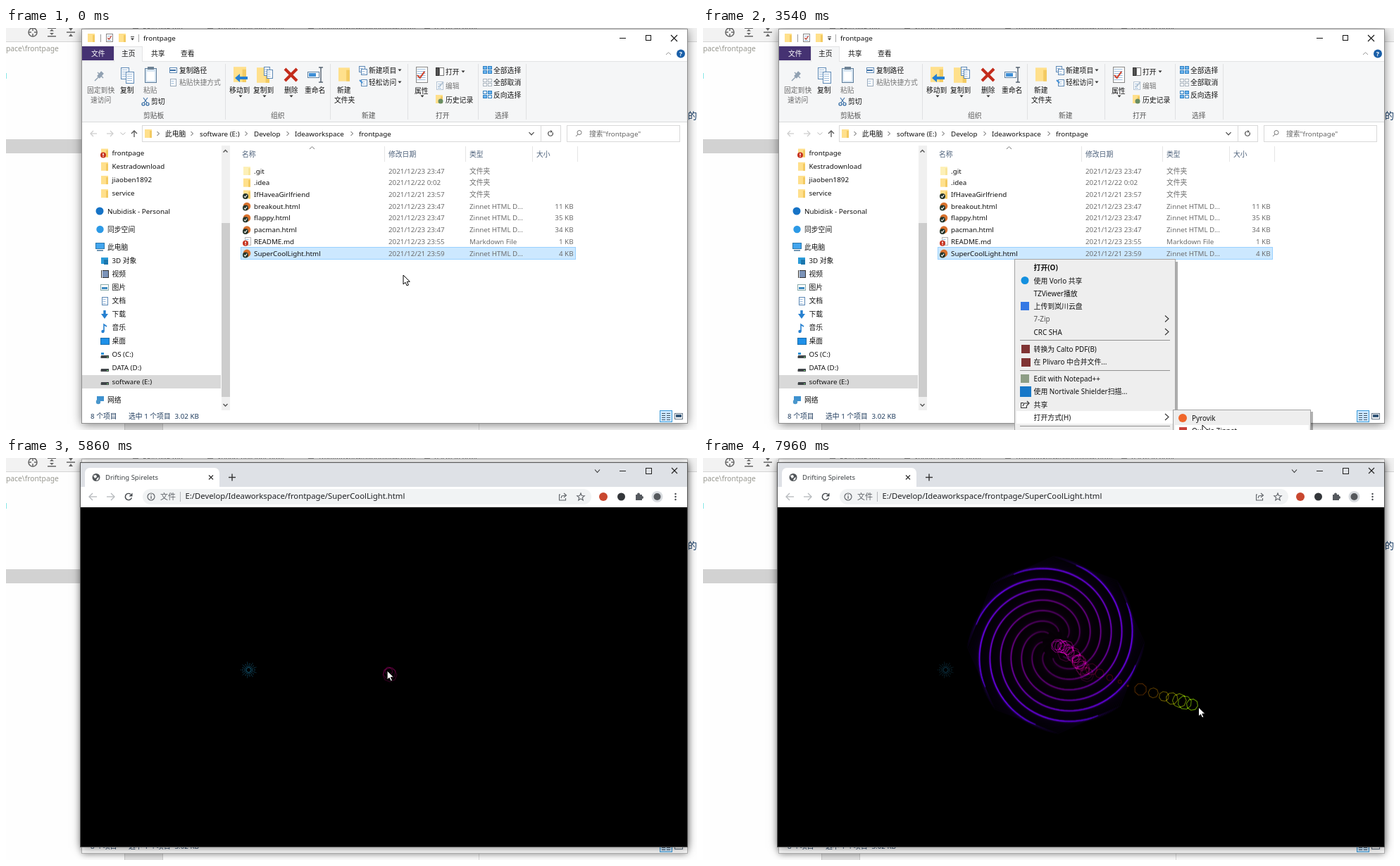
Write an HTML page with a canvas that moves like this. It is 981x571 px and loops after 8000 ms.

```html
<!DOCTYPE html>
<html lang="zh-CN">
<head>
<meta charset="utf-8">
<style>
html,body{margin:0;width:100%;height:100%;overflow:hidden;background:#fff}
canvas{display:block}
</style>
</head>
<body>
<canvas id="stage" width="981" height="571"></canvas>
<script>
const LOOP = 8000;
const FONT = '"Noto Sans","Noto Sans CJK SC","Noto Sans CJK",sans-serif';
const cv = document.getElementById('stage');
const c = cv.getContext('2d');
const layer = document.createElement('canvas');
layer.width = layer.height = 280;
const g = layer.getContext('2d');

const clamp = (v, a = 0, b = 1) => Math.min(b, Math.max(a, v));
const mix = (a, b, u) => a + (b - a) * u;

function box(x, y, w, h, fill) { c.fillStyle = fill; c.fillRect(x, y, w, h); }
function rim(x, y, w, h, col) { c.strokeStyle = col; c.lineWidth = 1; c.strokeRect(x + .5, y + .5, w - 1, h - 1); }
function panel(x, y, w, h, fill, col) { box(x, y, w, h, fill); rim(x, y, w, h, col); }
function dot(x, y, r, fill) { c.fillStyle = fill; c.beginPath(); c.arc(x, y, r, 0, 7); c.fill(); }
function ring(x, y, r, col, w = 1) { c.strokeStyle = col; c.lineWidth = w; c.beginPath(); c.arc(x, y, r, 0, 7); c.stroke(); }
function round(x, y, w, h, r, fill) { c.fillStyle = fill; c.beginPath(); c.roundRect(x, y, w, h, r); c.fill(); }
function line(col, w, ...p) {
  c.strokeStyle = col; c.lineWidth = w; c.beginPath();
  for (let i = 0; i < p.length; i += 2) c.lineTo(p[i], p[i + 1]);
  c.stroke();
}
function poly(fill, ...p) {
  c.fillStyle = fill; c.beginPath();
  for (let i = 0; i < p.length; i += 2) c.lineTo(p[i], p[i + 1]);
  c.fill();
}
function txt(s, x, y, col = '#111', size = 9.8, weight = '') {
  c.font = `${weight} ${size}px ${FONT}`;
  c.fillStyle = col;
  c.fillText(s, x, y + 3.6);
}
function rtxt(s, x, y, col) { c.textAlign = 'right'; txt(s, x, y, col); c.textAlign = 'left'; }
function chevron(x, y, d, col, w = 1) { line(col, w, x - 3.5, y - d, x, y + d, x + 3.5, y - d); }
const caret = (x, y) => poly('#333', x - 2.5, y - 1.5, x + 2.5, y - 1.5, x, y + 1.5);

// Icons, placed by their centre
function folder(x, y, k = 1, pale) {
  box(x - 5 * k, y - 6 * k, 10 * k, 12 * k, pale ? '#fdf0b8' : '#ffe08c');
  box(x + 2 * k, y - 4 * k, 3 * k, 10 * k, pale ? '#f8e59c' : '#f3ca62');
}
function page(x, y, w, h, col = '#5c88b5') {
  panel(Math.round(x - w / 2), Math.round(y - h / 2), w, h, '#fff', col);
  for (let i = 3; i < h - 2; i += 3) box(x - w / 2 + 2, Math.round(y - h / 2) + i, w - 5, 1, '#9dbcdc');
}
function badge(x, y, bad) {
  dot(x, y, 4, bad ? '#c6321f' : '#25352a');
  if (bad) { box(x - .7, y - 2.5, 1.4, 3, '#fff'); box(x - .7, y + 1.3, 1.4, 1.2, '#fff'); }
  else line('#fff', 1.1, x - 2, y, x - .5, y + 1.7, x + 2.2, y - 1.8);
}
function arrowDown(x, y) {
  box(x - 1.7, y - 6, 3.4, 6, '#2680d0');
  poly('#2680d0', x - 5, y - 1, x + 5, y - 1, x, y + 6);
}
function monitor(x, y) { panel(x - 6, y - 6, 13, 9, '#42a5ee', '#2877ad'); box(x - 4, y + 4, 9, 2, '#7296b2'); }
function drive(x, y, sys) {
  if (sys) box(x - 5, y - 4, 4, 3, '#2f93d8');
  box(x - 5, y, 11, 4, '#3f4448'); box(x - 6, y + 1, 1, 3, '#aaa'); box(x + 3, y + 2, 2, 1, '#7ce07c');
}
function tick(x, y, k, col) { line(col, 1.6 * k, x - 4 * k, y, x - k, y + 3 * k, x + 4 * k, y - 4 * k); }

function backdrop() {
  box(0, 0, 981, 571, '#fefefe');
  box(0, 0, 981, 19, '#f2f2f2');
  box(0, 19, 981, 1, '#d5d5d5');
  ring(38, 6, 6, '#666', 1.5);
  line('#666', 1.5, 38, 0, 38, 4); line('#666', 1.5, 38, 8, 38, 12);
  line('#666', 1.5, 32, 6, 36, 6); line('#666', 1.5, 40, 6, 44, 6);
  box(59, 0, 12, 1, '#666'); box(59, 11, 12, 1.5, '#666');
  poly('#666', 62, 4.5, 68, 4.5, 65, 1.5); poly('#666', 62, 7, 68, 7, 65, 10);
  box(86, 5.3, 12, 1.5, '#666');
  poly('#666', 89, 0, 95, 0, 92, 4); poly('#666', 89, 12, 95, 12, 92, 8);
  for (const [s, x] of [['README.md', 194], ['SuperCoolLight.html', 300], ['TreeAndSnow\\MoonView.html', 443], ['pacman.html', 608]]) {
    txt(s, x, 0, '#777');
    box(x - 14, 0, 8, 3, '#999');
  }
  txt('pace\\frontpage', 0, 29, '#989890', 10.3);
  box(0, 64, 1, 8, '#88e8e8');
  box(0, 158, 108, 20, '#d2d2d2');
  txt('虑的', 955, 125, '#143b66', 13);
  box(168, 561, 55, 10, '#e6e6e6');
  box(168, 561, 1, 10, '#ccc'); box(222, 561, 1, 10, '#ccc'); box(671, 561, 1, 10, '#ddd');
}

// The shadow stays outside the rectangle, so a translucent fill is not darkened
function shadowed(x, y, w, h, fill, blur, alpha) {
  c.save();
  c.beginPath(); c.rect(0, 0, 981, 571); c.rect(x, y, w, h); c.clip('evenodd');
  c.shadowColor = `rgba(0,0,0,${alpha})`; c.shadowBlur = blur; c.shadowOffsetY = 2;
  box(x, y, w, h, '#fff');
  c.restore();
  box(x, y, w, h, fill);
}

function ribbon(off) {
  folder(121, 14);
  box(134, 9, 1, 11, '#999');
  page(147, 14, 10, 12, '#888'); tick(147, 14, .7, '#d0452f');
  folder(165, 14);
  box(177, 12, 5, 1, '#444'); caret(179.5, 16);
  box(188, 9, 1, 11, '#aaa');
  txt('frontpage', 195, 14, off ? '#8a8a8a' : '#111');
  const ctl = off ? '#999' : '#111';
  box(871, 14, 9, 1, ctl); rim(908, 10, 8, 8, ctl);
  line(ctl, 1.1, 944, 10, 953, 19); line(ctl, 1.1, 953, 10, 944, 19);
  box(108, 26, 45, 20, '#453272');
  txt('文件', 121, 36, '#fff');
  box(108, 47, 859, 86, '#f5f6f7');
  box(108, 47, 859, 1, '#e3e4e5');
  panel(153, 26, 41, 22, '#f5f6f7', '#e3e4e5'); box(154, 46, 39, 3, '#f5f6f7');
  txt('主页', 164, 36); txt('共享', 206, 36); txt('查看', 248, 36);
  line('#999', 1, 937, 38, 940.5, 34.5, 944, 38);
  dot(958, 36.5, 6, '#1a5fa8'); txt('?', 955.7, 36.5, '#fff', 9, 'bold');
  box(108, 133, 859, 1, '#dadbdc');
  for (const x of [311, 460, 570, 670, 738]) box(x, 51, 1, 79, '#e0e1e3');

  line('#91a1b2', 5, 131, 70, 137, 63); line('#91a1b2', 1.5, 130, 63, 138, 71); line('#91a1b2', 1.5, 126, 75, 132, 69);
  page(169, 64, 12, 17); page(176, 70, 12, 17);
  panel(197, 57, 17, 21, '#d8e6f2', '#5f7d9a'); box(201, 55, 9, 4, '#6e8294'); box(200, 62, 11, 13, '#fff');
  page(237, 60, 11, 8); box(233, 59, 8, 2, '#3b6fa5');
  page(237, 77, 9, 11, '#9ab');
  line('#4475a8', 1.2, 195, 99, 200, 106); line('#4475a8', 1.2, 201, 99, 196, 106);
  ring(195, 108, 2, '#2b65a0', 1.2); ring(201, 108, 2, '#2b65a0', 1.2);
  folder(332, 66, 1.8); poly('#2580d2', 325, 71, 332, 65, 332, 69, 343, 69, 343, 73, 332, 73, 332, 77);
  folder(365, 67, 1.8); page(370, 61, 9, 13); page(374, 65, 9, 13);
  line('#c32c1c', 4, 396, 58, 413, 75); line('#c32c1c', 4, 413, 58, 396, 75);
  panel(428, 62, 17, 9, '#fff', '#5d7f9f'); box(430, 64, 10, 5, '#3f8fd6');
  line('#345', 1.2, 444, 56, 450, 56); line('#345', 1.2, 447, 56, 447, 77); line('#345', 1.2, 444, 77, 450, 77);
  folder(480, 66, 1.6);
  page(505, 58, 9, 9); page(508, 62, 9, 9);
  page(508, 78, 9, 10); line('#3f8fd6', 2, 502, 74, 506, 78);
  page(590, 66, 17, 23, '#888'); tick(589, 67, 1.3, '#d0452f');
  panel(610, 56, 5, 12, '#555', '#333'); panel(615, 56, 7, 12, '#fff', '#777');
  page(616, 82, 10, 12, '#b5c4d3'); line('#b5c4d3', 2, 614, 84, 621, 77);
  folder(615, 101); dot(617, 104, 3.5, '#698d62');
  for (let i = 0; i < 3; i++) for (let k = 0; k < 4; k++) {
    const x = 677 + (k % 2) * 7, y = 54 + i * 17.5 + (k >> 1) * 6;
    panel(x, Math.round(y), 6, 5, i == 0 || i == 2 && (k == 1 || k == 2) ? '#6db5ef' : '#fff', i == 1 ? '#a9b4be' : '#2d7fc2');
  }
  const gray = '#777';
  txt('固定到快', 115, 88, '#666'); txt('速访问', 120, 102, '#666');
  txt('复制', 162, 88); txt('粘贴', 195, 88, gray);
  txt('复制路径', 246, 60); txt('粘贴快捷方式', 246, 77, gray); txt('剪切', 206, 104);
  txt('移动到', 317, 88); txt('复制到', 351, 88); txt('删除', 395, 88); txt('重命名', 424, 88);
  for (const x of [333, 367, 405, 591]) caret(x, 97);
  txt('新建', 470, 88); txt('文件夹', 466, 102);
  txt('新建项目', 515, 60); txt('轻松访问', 515, 77); caret(559, 60); caret(559, 77);
  txt('属性', 580, 89); txt('打开', 624, 62); caret(649, 62);
  txt('编辑', 624, 82, gray); txt('历史记录', 624, 102);
  txt('全部选择', 692, 60); txt('全部取消', 692, 77); txt('反向选择', 692, 95);
  for (const [s, x] of [['剪贴板', 195], ['组织', 376], ['新建', 505], ['打开', 610], ['选择', 694]]) txt(s, x, 124, '#555');
}

function addressBar() {
  line('#ccc', 1.2, 124, 146, 120, 150, 124, 154); line('#ccc', 1.2, 120, 150, 129, 150);
  line('#ccc', 1.2, 148, 146, 152, 150, 148, 154); line('#ccc', 1.2, 143, 150, 152, 150);
  chevron(166, 150, 1.5, '#bbb');
  line('#555', 1.3, 178, 150, 182, 146, 186, 150); line('#555', 1.3, 182, 146, 182, 155);
  panel(193, 138, 595, 24, '#fff', '#d9d9d9'); box(759, 138, 1, 24, '#d9d9d9');
  folder(202, 150);
  for (const x of [216, 264, 341, 400, 491]) line('#555', 1, x - 1.5, 147, x + 1.5, 150, x - 1.5, 153);
  for (const [s, x] of [['此电脑', 226], ['software (E:)', 275], ['Develop', 352], ['Ideaworkspace', 410], ['frontpage', 501]]) txt(s, x, 150);
  chevron(746, 150, 1.8, '#444', 1.2);
  c.strokeStyle = '#555'; c.lineWidth = 1.1; c.beginPath(); c.arc(773, 150, 3.3, -.6, 4.6); c.stroke();
  poly('#555', 773, 145, 776, 147, 773, 149);
  panel(796, 138, 161, 24, '#fff', '#d9d9d9');
  ring(814, 148.5, 3, '#777'); line('#777', 1, 812, 151, 809, 154);
  txt('搜索"frontpage"', 828, 150, '#666');
}

function sidebar() {
  box(108, 493, 197, 19, '#d9d9d9');
  ['frontpage', 'Kestradownload', 'jiaoben1892', 'service'].forEach((s, i) => {
    const y = 177 + i * 19.2;
    folder(140, y + .5); txt(s, 150.5, y);
  });
  badge(138, 180.5, true);
  dot(133, 260, 5.5, '#1673c6'); txt('Nubidisk - Personal', 144, 260);
  dot(133.5, 286, 5.2, '#2d9ae6'); txt('同步空间', 144, 286);
  monitor(133, 311); txt('此电脑', 144, 311);
  const names = ['3D 对象', '视频', '图片', '文档', '下载', '音乐', '桌面', 'OS (C:)', 'DATA (D:)', 'software (E:)'];
  names.forEach((s, i) => txt(s, 150.5, 330 + i * 19.1));
  box(135, 326, 10, 9, '#2b9bd8'); box(139, 329, 6, 7, '#1b76ae');
  panel(135, 344, 11, 11, '#7b93b8', '#333'); box(136, 344, 1, 11, '#eee');
  panel(134, 364, 12, 9, '#fff', '#8aa'); box(136, 368, 8, 3, '#3c8ac0');
  page(140, 388, 9, 12);
  arrowDown(140, 407);
  line('#2680d0', 1.6, 139, 431, 139, 421, 143, 424); dot(137.5, 431, 2.2, '#2680d0');
  panel(134, 440, 13, 10, '#1e90e8', '#1b6dab');
  drive(140, 465, true); drive(140, 484); drive(140, 503);
  box(129, 523, 10, 7, '#3e91cf'); dot(131, 531, 3.2, '#4a97cc'); txt('网络', 144, 528);
  box(306, 167, 12, 376, '#f0f0f0'); box(306, 277, 12, 247, '#cdcdcd');
  line('#555', 1.4, 308.5, 176.5, 311.5, 173.5, 314.5, 176.5);
  line('#555', 1.4, 308.5, 534, 311.5, 537, 314.5, 534);
}

const FILES = [
  ['.git', '23 23:47'], ['.idea', '22 0:02'], ['IfHaveaGirlfriend', '21 23:57'],
  ['breakout.html', '23 23:47', 11], ['flappy.html', '23 23:47', 35], ['pacman.html', '23 23:47', 34],
  ['README.md', '23 23:55', 1], ['SuperCoolLight.html', '21 23:59', 4]
];

function fileList(off) {
  const gray = '#6d6d6d';
  for (const x of [537, 652, 747, 811]) box(x, 168, 1, 22, '#e5e5e5');
  line('#777', 1, 431, 172, 434.5, 168.5, 438, 172);
  for (const [s, x] of [['名称', 335], ['修改日期', 543], ['类型', 658], ['大小', 753]]) txt(s, x, 179, '#4c607a');
  if (off) box(333, 311, 476, 18, '#d9d9d9');
  else panel(333, 311, 476, 18, '#cce8ff', '#99d1ff');
  FILES.forEach(([name, date, kb], i) => {
    const y = 203 + i * 16.7, html = name.endsWith('html');
    if (!kb) folder(342, y, 1, i == 0);
    else if (html) dot(342, y, 5.3, '#d9722e');
    else page(343, y, 9, 12, '#b5b5b5');
    if (i > 1) badge(340, y + 2.5, kb == 1);
    txt(name, 352, y);
    txt('2021/12/' + date, 543, y, gray);
    txt(!kb ? '文件夹' : html ? 'Zinnet HTML D...' : 'Markdown File', 658, y, gray);
    if (kb) rtxt(kb + ' KB', 805.5, y, gray);
  });
}

function explorer(off) {
  shadowed(108, 2, 859, 559, '#fff', off ? 9 : 14, off ? .4 : .55);
  ribbon(off);
  addressBar();
  sidebar();
  fileList(off);
  txt('8 个项目', 120, 551.5, '#1d3a5c');
  txt('选中 1 个项目', 174, 551.5, '#1d3a5c');
  txt('3.02 KB', 239.5, 551.5, '#1d3a5c');
  panel(928, 543, 18, 17, '#cce8ff', '#3a9ad9');
  for (let i = 0; i < 4; i++) { box(931, 547 + i * 3, 5, 1, '#456'); box(938, 547 + i * 3, 5, 1, '#456'); }
  panel(949, 547, 12, 9, '#fff', '#678'); box(951, 549, 8, 4, '#357');
  rim(107, 1, 861, 561, off ? '#b5b5b5' : '#8f8f8f');
}

const MENU = [
  ['打开(O)', 340.5], ['使用 Vorlo 共享', 359], ['TZViewer播放', 377], ['上传到岚川云盘', 395.5],
  ['7-Zip', 413.5, 1], ['CRC SHA', 432, 1], ['转换为 Calto PDF(B)', 456], ['在 Plivaro 中合并文件...', 474.5],
  ['Edit with Notepad++', 498], ['使用 Nortivale Shielder扫描...', 516.5], ['共享', 535], ['打开方式(H)', 553, 1]
];

function menu(t, p) {
  if (t < 960 || t > 4190) return;
  c.save();
  c.globalAlpha = Math.min(clamp((t - 940) / 110), clamp((4190 - t) / 40));
  box(446, 332, 228, 240, 'rgba(0,0,0,.32)');
  panel(442, 328, 229, 250, '#eee', '#a3a3a3');
  const sub = t > 2900;
  MENU.forEach(([s, y, more], i) => {
    if (sub ? i == 11 : Math.abs(p[1] - y) < 9.2 && p[0] > 444) box(445, y - 9, 223, 18, '#fff');
    txt(s, 469.5, y, i == 4 && t > 1900 ? '#555' : '#111', 9.9, i ? '' : 'bold');
    if (more) line('#333', 1.1, 656, y - 5, 661, y - .5, 656, y + 4);
  });
  for (const y of [443, 486, 565]) box(450, y, 213, 1, '#919191');
  dot(457, 358.5, 5.5, '#1490df');
  box(451, 389, 12, 12, '#3478e4');
  box(452, 450, 12, 12, '#803434');
  box(452, 469, 13, 12, '#803434');
  box(451, 492, 12, 12, '#8d9d85');
  box(450, 509, 16, 15, '#1878c8');
  rim(451, 532, 9, 8, '#333');
  box(455, 530, 6, 6, '#eee');
  line('#333', 1.2, 454, 537, 456, 533, 463, 533); line('#333', 1.2, 460, 530, 463, 533, 460, 536);
  if (sub) {
    c.globalAlpha *= clamp((t - 2890) / 90);
    box(670, 545, 196, 30, 'rgba(0,0,0,.3)');
    panel(667, 542, 196, 40, '#eee', '#a3a3a3');
    const low = p[1] > 560;
    if (p[0] > 668) box(670, low ? 564 : 545, 190, 18, '#fff');
    dot(681, 554, 6, '#f0662a');
    txt('Pyrovik', 694, 554, '#111', 9.9);
    box(676, 567, 11, 11, '#c9423a');
    txt('Quorla Zinnet', 694, 572.5, '#111', 9.9);
  }
  c.restore();
}

// Page content
const MID = [501, 265.5], TWIST = 20.57, APO = Math.cos(Math.PI / 8);
const turn = R => (126 - R) / TWIST - .03;

function octagon(k, x, y, r, a) {
  k.beginPath();
  for (let i = 0; i < 8; i++) k.lineTo(x + r * Math.cos(a + i * Math.PI / 4), y + r * Math.sin(a + i * Math.PI / 4));
  k.closePath();
}

// Curves that the edges of the turning, growing octagon touch
function arms(top, width, alpha) {
  g.lineWidth = width;
  g.strokeStyle = `rgba(255,255,255,${alpha})`;
  for (let i = 0; i < 8; i++) {
    g.beginPath();
    for (let R = 2; R <= top; R += 1.5) {
      const f = turn(R) + (i + .5) * Math.PI / 4, p = APO * R, q = -APO * TWIST;
      g.lineTo(140 + p * Math.cos(f) - q * Math.sin(f), 140 + p * Math.sin(f) + q * Math.cos(f));
    }
    g.stroke();
  }
}

function galaxy(t) {
  const top = clamp((t - 6230) * .106, 0, 126), u = top / 126;
  if (top < 2) return;
  g.globalCompositeOperation = 'source-over';
  g.fillStyle = '#000';
  g.fillRect(0, 0, 280, 280);
  g.globalCompositeOperation = 'lighter';
  g.lineWidth = 1.2;
  for (let R = 1; R <= top; R += .8) {
    g.strokeStyle = `rgba(255,255,255,${.045 + .04 * clamp(1 - (top - R) / 10)})`;
    octagon(g, 140, 140, R, turn(R));
    g.stroke();
  }
  g.save();
  octagon(g, 140, 140, top, turn(top));
  g.clip();
  arms(top, mix(9, 4, u), .1);
  arms(top, mix(4, 2.4, u), .2);
  arms(top, 1.1, mix(.35, .5, u));
  g.restore();
  const fade = g.createRadialGradient(140, 140, 0, 140, 140, Math.max(top, 10));
  fade.addColorStop(0, `hsl(302 100% ${mix(38, 12, u)}%)`);
  fade.addColorStop(.5, `hsl(${mix(298, 287, u)} 100% ${mix(38, 27, u)}%)`);
  fade.addColorStop(.85, `hsl(${mix(296, 266, u)} 100% ${mix(40, 49, u)}%)`);
  fade.addColorStop(.94, `hsl(${mix(295, 263, u)} 100% ${mix(40, 36, u)}%)`);
  fade.addColorStop(1, `hsl(${mix(294, 260, u)} 100% ${mix(38, 26, u)}%)`);
  g.globalCompositeOperation = 'multiply';
  g.fillStyle = fade;
  g.fillRect(0, 0, 280, 280);
  c.drawImage(layer, MID[0] - 140, MID[1] - 140);
}

function trail(t, from, to, step, style) {
  for (let s = from, k = 0; s <= Math.min(t, to); s += step, k++) {
    const [x, y] = cursorAt(s), [r, hue, alpha] = style((s - from) / (to - from), k);
    c.strokeStyle = `hsla(${hue},100%,38%,${alpha})`;
    octagon(c, x + (k % 3) - 1, y - 1, r, k * .5);
    c.stroke();
  }
}

function rosette(t) {
  const col = `rgba(24,112,150,${mix(.85, .5, clamp((t - 5730) / 2200))})`;
  ring(344.5, 301, 3.5, col, .9);
  c.setLineDash([2, 1]);
  for (let i = 0; i < 18; i++) {
    const a = i * Math.PI / 9, r = i % 2 ? 11.5 : 9.5;
    line(col, .8, 344.5 + 4.5 * Math.cos(a), 301 + 4.5 * Math.sin(a), 344.5 + r * Math.cos(a), 301 + r * Math.sin(a));
  }
  c.setLineDash([]);
}

function browserUI() {
  box(106, 7, 862, 34, '#dee1e6');
  box(106, 41, 862, 29, '#fff');
  round(112, 14, 191, 32, [7, 7, 0, 0], '#fff');
  dot(128, 27.5, 5.5, '#505458');
  poly('#fff', 124, 25, 128, 24, 129, 27, 126, 29); poly('#fff', 129, 29, 132, 27, 131, 31, 128, 32);
  txt('Drifting Spirelets', 141, 27.5, '#3c4043', 9.5);
  line('#333', 1.2, 288, 24.5, 294, 30.5); line('#333', 1.2, 294, 24.5, 288, 30.5);
  line('#333', 1.4, 316, 27.5, 326, 27.5); line('#333', 1.4, 321, 22.5, 321, 32.5);
  chevron(839.5, 18.5, 2, '#333', 1.1);
  box(871, 18, 9, 1, '#222'); rim(908, 14, 9, 9, '#222');
  line('#222', 1.1, 945, 14, 953, 22); line('#222', 1.1, 953, 14, 945, 22);
  line('#b5b8bc', 1.3, 123, 50, 118, 55, 123, 60); line('#b5b8bc', 1.3, 118, 55, 129, 55);
  line('#b5b8bc', 1.3, 149, 50, 154, 55, 149, 60); line('#b5b8bc', 1.3, 143, 55, 154, 55);
  c.strokeStyle = '#44484c'; c.lineWidth = 1.5; c.beginPath(); c.arc(174, 55, 4.6, .3, 5.4); c.stroke();
  poly('#44484c', 179.5, 49.5, 179.5, 54.5, 174.5, 54.5);
  round(194, 44, 637, 22, 11, '#f1f3f4');
  ring(206, 55, 5, '#5f6368', 1.2); box(205.4, 54, 1.3, 4, '#5f6368'); box(205.4, 51.6, 1.3, 1.3, '#5f6368');
  txt('文件', 219, 55, '#5f6368', 11); box(247, 48, 1, 14, '#b5b8bc');
  txt('E:/Develop/Ideaworkspace/frontpage/SuperCoolLight.html', 254.5, 54.7, '#202124', 11.3);
  line('#5f6368', 1.1, 787, 52, 785.5, 52, 785.5, 60, 794.5, 60, 794.5, 57);
  line('#5f6368', 1.1, 788, 57, 789, 54, 795, 53); line('#5f6368', 1.1, 792, 50, 795.5, 53, 792, 56);
  c.strokeStyle = '#5f6368'; c.lineWidth = 1.1; c.beginPath();
  for (let i = 0; i < 10; i++) {
    const r = i % 2 ? 2.4 : 5.5, a = i * Math.PI / 5 - Math.PI / 2;
    c.lineTo(816 + r * Math.cos(a), 55.5 + r * Math.sin(a));
  }
  c.closePath(); c.stroke();
  dot(848, 55, 6, '#c9472f');
  dot(873.5, 55, 5.5, '#33363a');
  box(894, 52, 9, 8, '#55595e'); dot(898, 51.5, 2, '#55595e'); dot(903, 56, 2, '#55595e');
  dot(924.5, 55, 8, '#d9dce0'); dot(924.5, 55, 5, '#55585c');
  for (const y of [51, 55, 59]) dot(950.5, y, 1.2, '#44484c');
}

function browser(t) {
  const u = clamp((t - 4880) / 220);
  if (!u) return;
  const k = .95 + .05 * u, w = 862 * k, h = 546 * k, x = 537 - w / 2, y = 279 - h / 2;
  c.save();
  c.globalAlpha = u ** 1.2;
  shadowed(x, y, w, h, '#fefefe', 12, .5);
  c.restore();
  if (u < 1) return;
  if (t >= 5730) {
    browserUI();
    box(106, 70, 862, 482, '#000');
    c.save();
    c.beginPath(); c.rect(106, 70, 862, 482); c.clip();
    c.globalCompositeOperation = 'lighter';
    rosette(t);
    galaxy(t);
    c.lineWidth = 1.1;
    const dim = mix(1, .7, clamp((t - 6770) / 1200));
    trail(t, 5800, 6230, 22, (u, k) => [5 + 5 * Math.abs(Math.sin(k * .9 + 1.4)), mix(322, 302, u), mix(.25, .75, u) * dim]);
    trail(t, 7500, 7950, 33, (u, k) => [u < .48 ? Math.max(1, 12 - 26 * u) : 8.4 + 1.6 * Math.cos(k * 1.1), mix(315, 440, Math.min(1, u * 1.15)), mix(.25, .8, u * u)]);
    c.restore();
  }
  rim(105, 6, 863, 547, '#555');
}

// Pointer: time, x, y
const PATH = [
  [0, 564, 351], [180, 564, 351], [540, 443, 328], [1150, 443, 328], [1550, 474, 350], [1690, 476, 360],
  [2000, 478, 440], [2400, 470, 532], [2600, 500, 550], [3200, 687, 553], [3270, 690, 554], [3470, 690, 554],
  [3540, 709, 564], [3750, 711, 565], [4150, 711, 565], [4920, 633, 384], [5660, 547, 313], [5800, 546, 309],
  [6000, 530, 286], [6110, 515, 270], [6230, 501, 267], [7470, 501, 267], [7560, 548, 300], [7700, 605, 325],
  [7800, 657, 340], [7960, 703.5, 354]
];
function cursorAt(t) {
  const i = PATH.findIndex(p => p[0] > t);
  if (i < 0) return PATH[PATH.length - 1].slice(1);
  const [t0, x0, y0] = PATH[i - 1], [t1, x1, y1] = PATH[i], u = (t - t0) / (t1 - t0);
  return [mix(x0, x1, u), mix(y0, y1, u)];
}
function pointer(t, [x, y]) {
  if (t >= 800 && t < 1000) {
    ring(x, y, 8.5, '#8fd0f5', 3);
    c.strokeStyle = '#1b7fd0'; c.beginPath(); c.arc(x, y, 8.5, t / 120, t / 120 + 2); c.stroke();
    return;
  }
  c.save();
  c.translate(x, y);
  poly('#fff', 0, 0, 0, 13, 3, 10.3, 5.2, 15, 7.4, 14, 5.3, 9.4, 9.3, 9.2);
  c.closePath();
  c.strokeStyle = '#000'; c.lineWidth = 1; c.stroke();
  c.restore();
}

function draw(t) {
  const p = cursorAt(t);
  backdrop();
  explorer(t >= 4850);
  menu(t, p);
  browser(t);
  pointer(t, p);
}

const start = performance.now();
function play() {
  draw((performance.now() - start) % LOOP);
  requestAnimationFrame(play);
}
play();
</script>
</body>
</html>
```
